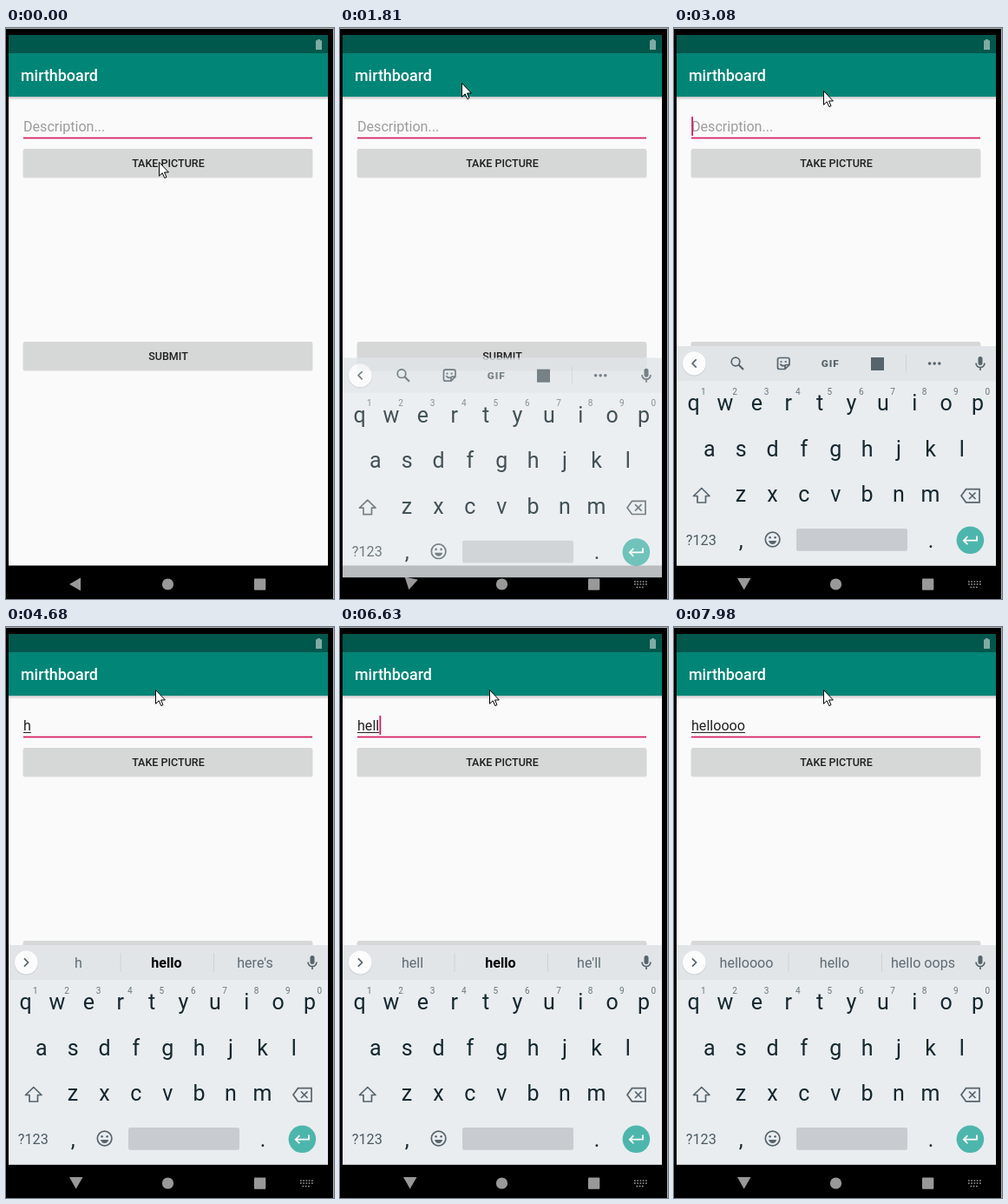
These frames come from a looping animation (378x657 px, 8000 ms). An HTML page:

```html
<!DOCTYPE html>
<html lang="en">
<head>
<meta charset="utf-8">
<title>Posting a description</title>
<style>
html, body { margin: 0; width: 100%; height: 100%; overflow: hidden; background: #000; }
svg { display: block; font-family: Roboto, "Noto Sans", sans-serif; }
.mid { text-anchor: middle; }
.field { font-size: 16.1px; }
.label { font-size: 12.53px; font-weight: 500; fill: #1f1f1f; }
.line { fill: none; stroke: #56646c; stroke-width: 1.7; }
.icon { fill: #56646c; }
.nav { fill: #999; }
#keys { font-size: 25px; fill: #13272f; }
#keys .digit { font-size: 10px; fill: #68757c; }
#words { font-size: 16.1px; fill: #5f6b72; }
</style>
</head>
<body>
<svg width="378" height="657" viewBox="0 0 378 657">
  <defs>
    <linearGradient id="shade" x2="0" y2="1">
      <stop stop-color="#000" stop-opacity=".22"/>
      <stop offset="1" stop-color="#000" stop-opacity="0"/>
    </linearGradient>
    <g id="button">
      <rect x="19.5" y=".8" width="334" height="32.7" rx="2" opacity=".13"/>
      <rect x="20" width="333" height="32" rx="2" fill="#d6d7d7"/>
    </g>
  </defs>
  <rect width="378" height="657"/>
  <path d="M0 .5H377.5V657" fill="none" stroke="#b4b4b4"/>

  <!-- App -->
  <rect x="3" y="8" width="368" height="610.5" fill="#fafafa"/>
  <rect x="3" y="8" width="368" height="21" fill="#00574b"/>
  <path d="M357 14.2h2V13h3v1.2h2V25h-7z" fill="#80aba5"/>
  <rect x="3" y="29" width="368" height="50" fill="#008577"/>
  <rect x="3" y="79" width="368" height="4" fill="url(#shade)"/>
  <text x="17" y="61" font-size="17.9" font-weight="500" fill="#fff">mirthboard</text>
  <text id="hint" class="field" x="20" y="119.3" fill="#9c9c9c">Description...</text>
  <text id="typed" class="field" x="20" y="119.3" fill="#212121"></text>
  <rect id="underline" x="20" y="121" height="1" fill="#212121"/>
  <rect x="20" y="125.7" width="333" height="1.7" fill="#d81b60"/>
  <rect id="caret" y="102" width="1.8" height="22" fill="#d81b60"/>
  <use href="#button" y="139"/>
  <text class="label mid" x="187" y="160">TAKE PICTURE</text>
  <use href="#button" y="361"/>
  <text class="label mid" x="187" y="382">SUBMIT</text>

  <!-- Navigation bar -->
  <path id="backLeft" class="nav" d="M73 640L86 632.5V647.5Z"/>
  <path id="backDown" class="nav" d="M73 633H88.5L80.7 646.5Z"/>
  <circle class="nav" cx="186.5" cy="640" r="6.6"/>
  <rect class="nav" x="286" y="633.5" width="13.3" height="13.3" rx="1"/>
  <path id="switcher" d="M339 637H354M339 640H354M341.5 643.5H351" stroke="#999" stroke-width="1.7" stroke-dasharray="1.7 1.55"/>

  <!-- Keyboard -->
  <g id="board">
    <rect x="3" y="366" width="368" height="252.5" fill="#e9edf0"/>
    <rect x="3" y="366" width="368" height="40" fill="#e1e5e8"/>
    <circle cx="23.3" cy="386.7" r="13.8" opacity=".1"/>
    <circle cx="23.3" cy="386" r="13.4" fill="#fcfcfc"/>
    <path id="chevron" class="line" d="M2.4-4.6L-2.2 0L2.4 4.6"/>

    <g id="tools">
      <circle class="line" cx="71" cy="384" r="4.8"/>
      <path class="line" d="M74.5 387.5L80 393" style="stroke-width:2.2"/>
      <path class="line" d="M121.5 379.5H131Q133 379.5 133 381.5V387.5L128 392.5H121.5Q119.5 392.5 119.5 390.5V381.5Q119.5 379.5 121.5 379.5ZM128 392V389.5Q128 387.5 130 387.5H133M122.5 386.5Q124.5 390 128 388"/>
      <circle class="icon" cx="123.5" cy="384" r="1.1"/>
      <circle class="icon" cx="128.7" cy="384" r="1.1"/>
      <text class="icon mid" x="180.3" y="390" font-size="11.8" font-weight="900" letter-spacing="1">GIF</text>
      <rect class="icon" x="227" y="379" width="15" height="15"/>
      <path d="M267.5 376V396" stroke="#cdd2d5"/>
      <circle class="icon" cx="294.6" cy="386" r="1.8"/>
      <circle class="icon" cx="300.2" cy="386" r="1.8"/>
      <circle class="icon" cx="305.8" cy="386" r="1.8"/>
    </g>

    <g id="words">
      <path d="M132 375V397M239.5 375V397" stroke="#cdd2d5"/>
      <text class="mid" x="83.5" y="392"></text>
      <text class="mid" x="185" y="392"></text>
      <text class="mid" x="287" y="392"></text>
    </g>

    <rect class="icon" x="350.5" y="378" width="5" height="10" rx="2.5"/>
    <path class="line" d="M348 385.5Q348.5 390.5 353 390.5T358 385.5M353 390.5V394"/>

    <g id="keys"></g>
    <path class="line" d="M31.8 529.5L41 538.5H36.5V546H27V538.5H22.5Z" stroke-linejoin="round"/>
    <path class="line" d="M336.5 530.7H352V545.8H336.5L331 538.2ZM340 534.5L347.5 542M347.5 534.5L340 542"/>
    <text x="13.8" y="594.7" font-size="16.2" fill="#4b5a62">?123</text>
    <circle class="line" cx="113.6" cy="588.5" r="8.3"/>
    <circle class="icon" cx="110.6" cy="586.2" r="1.3"/>
    <circle class="icon" cx="116.6" cy="586.2" r="1.3"/>
    <path class="icon" d="M109 590H118.2Q117 594 113.6 594T109 590Z"/>
    <rect x="141" y="576" width="128" height="25.7" rx="2" fill="#c8ccd0"/>
    <circle cx="341.4" cy="589.3" r="15.8" fill="#4db6ac"/>
    <path d="M349 584.5V589.7H334M338.3 585.2L333.8 589.7L338.3 594.2" fill="none" stroke="#fff" stroke-width="1.8"/>
  </g>

  <path id="cursor" d="M.5.5V16.3L4.2 12.8L6.8 18.6L9 17.6L6.5 12H11.4Z" fill="#fff" stroke="#000"/>
</svg>
<script>
const LOOP = 8000;
const $ = id => document.getElementById(id);
const show = (id, on) => $(id).style.display = on ? "" : "none";

function addKey(label, x, y, cls = "") {
  $("keys").insertAdjacentHTML("beforeend", `<text class="mid ${cls}" x="${x}" y="${y}">${label}</text>`);
}

[["qwertyuiop", 22.5], ["asdfghjkl", 40.7], ["zxcvbnm", 77]].forEach(([row, left], r) =>
  [...row].forEach((key, i) => {
    const x = left + 36.4 * i;
    addKey(key, x, 440 + 52.5 * r);
    if (r === 0) addKey((i + 1) % 10, x + 11.2, 421.5, "digit");
  }));
addKey(",", 77.3, 597.5);
addKey(".", 296, 597.5);

// Each track lists [start time, ...values]
const pointer = [[0, 176, 154], [120, 156, 123], [270, 156, 114], [390, 156, 106], [1810, 140, 63], [2080, 172, 72]];
const blinks = [120, 670, 1230, 1540, 2080, 2640, 3080, 3700, 4130, 4680, 5240, 7980];
// Typed text, three suggestions, whether the middle one is bold
const typing = [
  [0, "", "", "", "", false],
  [4280, "h", "h", "hello", "here's", true],
  [5640, "he", "hello", "he", "here's", false],
  [6100, "hel", "hel", "hello", "held", true],
  [6630, "hell", "hell", "hello", "he'll", true],
  [7060, "hello", "hellos", "hello", "hello I'm", true],
  [7580, "helloooo", "helloooo", "hello", "hello oops", false]
];
const at = (track, t) => track.findLast(step => step[0] <= t).slice(1);
const words = document.querySelectorAll("#words text");

function draw(t) {
  const [x, y] = at(pointer, t);
  $("cursor").setAttribute("transform", `translate(${x} ${y})`);

  const [text, ...rest] = at(typing, t);
  $("typed").textContent = text;
  const width = text ? $("typed").getComputedTextLength() : 0;
  $("underline").setAttribute("width", width);
  $("caret").setAttribute("x", 20.2 + width);
  show("caret", blinks.filter(b => b <= t).length % 2);
  show("hint", !text);
  show("tools", !text);
  show("words", text);
  words.forEach((word, i) => word.textContent = rest[i]);
  words[1].setAttribute("font-weight", rest[3] ? 700 : 400);
  words[1].setAttribute("fill", rest[3] ? "#000" : "#5f6b72");
  $("chevron").setAttribute("transform", `translate(23.3 386) scale(${text ? -1 : 1} 1)`);

  const open = t >= 1810, sliding = open && t < 1930;
  show("board", open);
  show("switcher", open);
  show("backLeft", !open);
  show("backDown", open);
  $("board").setAttribute("transform", `translate(0 ${sliding ? 13.7 : 0})`);
  $("board").setAttribute("opacity", sliding ? 0.8 : 1);
  $("backDown").setAttribute("transform", `rotate(${sliding ? 12 : 0} 80.7 640)`);
}

const start = performance.now();
function tick() {
  draw((performance.now() - start) % LOOP);
  requestAnimationFrame(tick);
}
tick();
</script>
</body>
</html>
```
